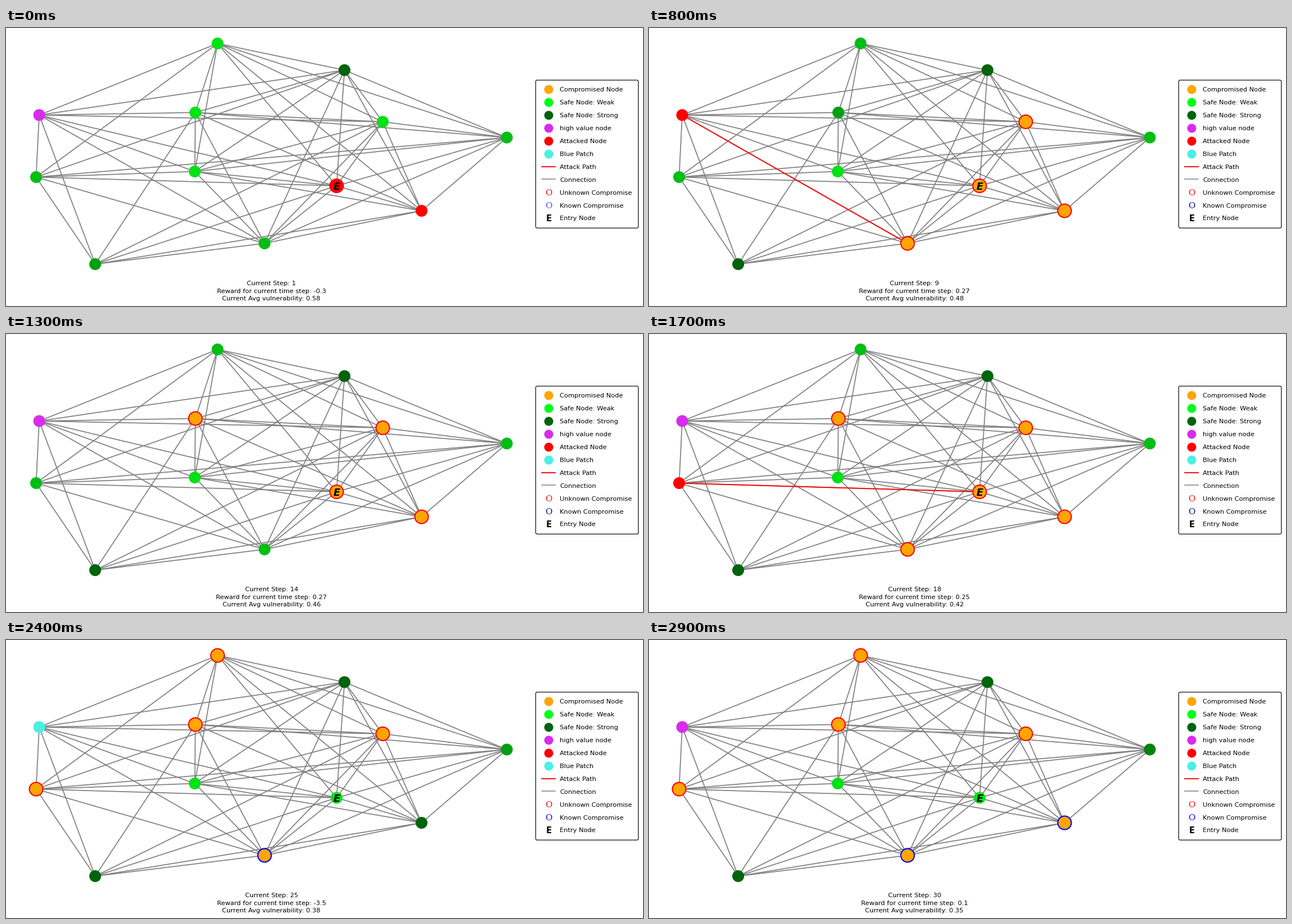
Animation of 1132x495 px, one loop 4 s. Source, as a matplotlib script:

```python
import matplotlib.pyplot as plt
from matplotlib.animation import FuncAnimation
from matplotlib.collections import LineCollection
from matplotlib.patches import FancyBboxPatch

W, H, DPI = 1132, 495, 100
PX = 72 / DPI  # points per pixel
STEPS, FRAMES = 30, 40

ORANGE, RED, BLUE, CYAN, PURPLE = "#ffa500", "#ff0000", "#0000ff", "#4af0e4", "#d92bee"
GRAY, NAVY = "#808080", "#000080"
WEAK, STRONG = "#00ff1a", "#00640c"

NODES = dict(
    A=(376, 27.5), B=(601.5, 75), C=(59, 155), D=(336.5, 150.5),
    F=(669.5, 167), G=(890, 195), H=(53.5, 265.5), I=(335.5, 255.5),
    E=(587.5, 281), J=(738.5, 325.5), K=(459.5, 383.5), L=(158.5, 420.5))
LINKS = dict(A="BCDEFGHIJ", B="CDEFGHIJK", C="DEFHIKL", D="FGIJKL",
             E="FGHIJKL", F="GIJKL", G="HIJK", H="IKL", I="JK", J="KL", K="L")

# state -> (fill, ring); no ring means the smaller plain dot
LOOKS = {
    "v1": ("#00e117", None), "v2": ("#00be14", None), "v3": ("#00a011", None),
    "v4": ("#00820e", None), "v5": (STRONG, None), "high": (PURPLE, None),
    "hit": (RED, None), "patch": (CYAN, None), "taken": (RED, RED),
    "lost": (ORANGE, RED), "known": (ORANGE, BLUE)}

# node -> {first step: state}
STORY = dict(
    A={1: "v1", 2: "patch", 3: "v2", 10: "hit", 11: "v2", 16: "hit", 17: "v2",
       21: "taken", 22: "lost"},
    B={1: "v5"},
    C={1: "high", 9: "hit", 10: "high", 15: "hit", 16: "high", 25: "patch",
       26: "high"},
    D={1: "v1", 4: "patch", 5: "v2", 7: "patch", 8: "v3", 11: "taken", 12: "lost"},
    E={1: "taken", 2: "lost", 22: "patch", 23: "v1"},
    F={1: "v1", 2: "taken", 3: "lost"},
    G={1: "v2", 24: "patch", 25: "v3", 27: "patch", 28: "v4"},
    H={1: "v2", 6: "hit", 7: "v2", 12: "hit", 13: "v2", 18: "hit", 19: "v2",
       20: "taken", 21: "lost"},
    I={1: "v1"},
    J={1: "hit", 2: "v2", 3: "patch", 4: "v5", 8: "taken", 9: "lost",
       23: "patch", 24: "v5", 28: "taken", 29: "known"},
    K={1: "v2", 4: "taken", 5: "lost", 13: "patch", 14: "v2", 17: "taken",
       18: "lost", 19: "known"},
    L={1: "v3", 5: "hit", 6: "patch", 7: "v5"})

ATTACKS = {2: "EF", 4: "EK", 5: "KL", 6: "KH", 8: "FJ", 9: "KC", 10: "JA",
           11: "JD", 12: "KH", 15: "DC", 16: "FA", 17: "JK", 18: "EH",
           20: "KH", 21: "JA", 28: "FJ"}

REWARDS = {1: -0.3, 2: 0.3, 3: -0.32, 4: 0.3, 6: 0.29, 9: 0.27, 15: -0.3, 16: 0.27,
           18: 0.25, 20: 0.24, 21: -0.34, 22: -0.4, 23: -0.4, 24: 0.18,
           25: -3.5, 26: 0.12, 30: 0.1}
AVERAGES = {1: 0.58, 3: 0.57, 4: 0.56, 5: 0.55, 6: 0.53, 7: 0.51, 8: 0.49,
            9: 0.48, 12: 0.47, 14: 0.46, 16: 0.44, 18: 0.42, 20: 0.41, 21: 0.4,
            23: 0.39, 24: 0.38, 27: 0.36, 29: 0.35}


def at(track, step):
    """Latest value of a track at the given step."""
    return track[max(s for s in track if s <= step)]


plt.rcParams["font.family"] = "DejaVu Sans"
FONT = 8.2

fig = plt.figure(figsize=(W / DPI, H / DPI), dpi=DPI, facecolor="white")
ax = fig.add_axes([0, 0, 1, 1])
ax.set_xlim(0, W)
ax.set_ylim(H, 0)
ax.axis("off")

links = [(NODES[a], NODES[b]) for a, ends in LINKS.items() for b in ends]
ax.add_collection(LineCollection(links, colors=GRAY, linewidths=1.25, zorder=1))
path, = ax.plot([], [], color=RED, lw=1.35, zorder=2)
dots = ax.scatter(*zip(*NODES.values()), s=200, zorder=3)
ax.text(NODES["E"][0], NODES["E"][1] + 0.5, "E", size=13, weight="bold",
        style="italic", ha="center", va="center_baseline", zorder=4)
status = [ax.text(471.8, y, "", size=FONT, ha="center", va="baseline")
          for y in (458, 471.7, 485.4)]


def letter(y, char, color, family):
    weight = "bold" if char == "E" else "normal"
    size = 10.6 if char == "E" else 10.8
    return ax.text(964.2, y, char, color=color, size=size, family=family, weight=weight,
                   ha="center", va="center_baseline")


def draw_legend():
    ax.add_patch(FancyBboxPatch((944, 95.5), 177, 258, boxstyle="round,pad=2.7",
                                fc="white", ec="black", lw=0.85))
    rows = [("Compromised Node", ORANGE), ("Safe Node: Weak", WEAK),
            ("Safe Node: Strong", STRONG), ("high value node", PURPLE),
            ("Attacked Node", RED), ("Blue Patch", CYAN), ("Attack Path", RED),
            ("Connection", GRAY), ("Unknown Compromise", RED),
            ("Known Compromise", BLUE), ("Entry Node", "black")]
    for i, (label, color) in enumerate(rows):
        y = 109 + 22.95 * i
        ax.text(984, y + 4, label, size=FONT, va="baseline")
        if i < 6:
            ax.plot(964, y, "o", ms=16 * PX, mew=0, color=color)
        elif i < 8:
            ax.plot([952, 975.5], [y - 0.2] * 2, color=color, lw=1.35 if i == 6 else 1.1)
        elif i < 10:
            mark = letter(y, "O", color, "DejaVu Serif")
            if i == 9:
                known = mark
        else:
            letter(y, "E", color, "DejaVu Sans")
    return known


known_mark = draw_legend()


def draw(frame):
    step = min(frame + 1, STEPS)
    looks = [LOOKS[at(STORY[name], step)] for name in NODES]
    dots.set_facecolors([fill for fill, _ in looks])
    dots.set_edgecolors([ring or fill for fill, ring in looks])
    dots.set_sizes([((24 if ring else 20) * PX) ** 2 for _, ring in looks])
    dots.set_linewidths([2.1 * PX if ring else PX for _, ring in looks])

    ends = [NODES[name] for name in ATTACKS.get(step, "")]
    path.set_data([x for x, _ in ends], [y for _, y in ends])

    known_mark.set_color("#4a4aff" if step == 1 else NAVY if step < 19 else BLUE)
    status[0].set_text(f"Current Step: {step}")
    status[1].set_text(f"Reward for current time step: {at(REWARDS, step)}")
    status[2].set_text(f"Current Avg vulnerability: {at(AVERAGES, step)}")
    return [path, dots, known_mark, *status]


anim = FuncAnimation(fig, draw, frames=FRAMES, interval=100, repeat=True,
                     repeat_delay=0, init_func=lambda: draw(0), blit=False)
plt.show()
```
